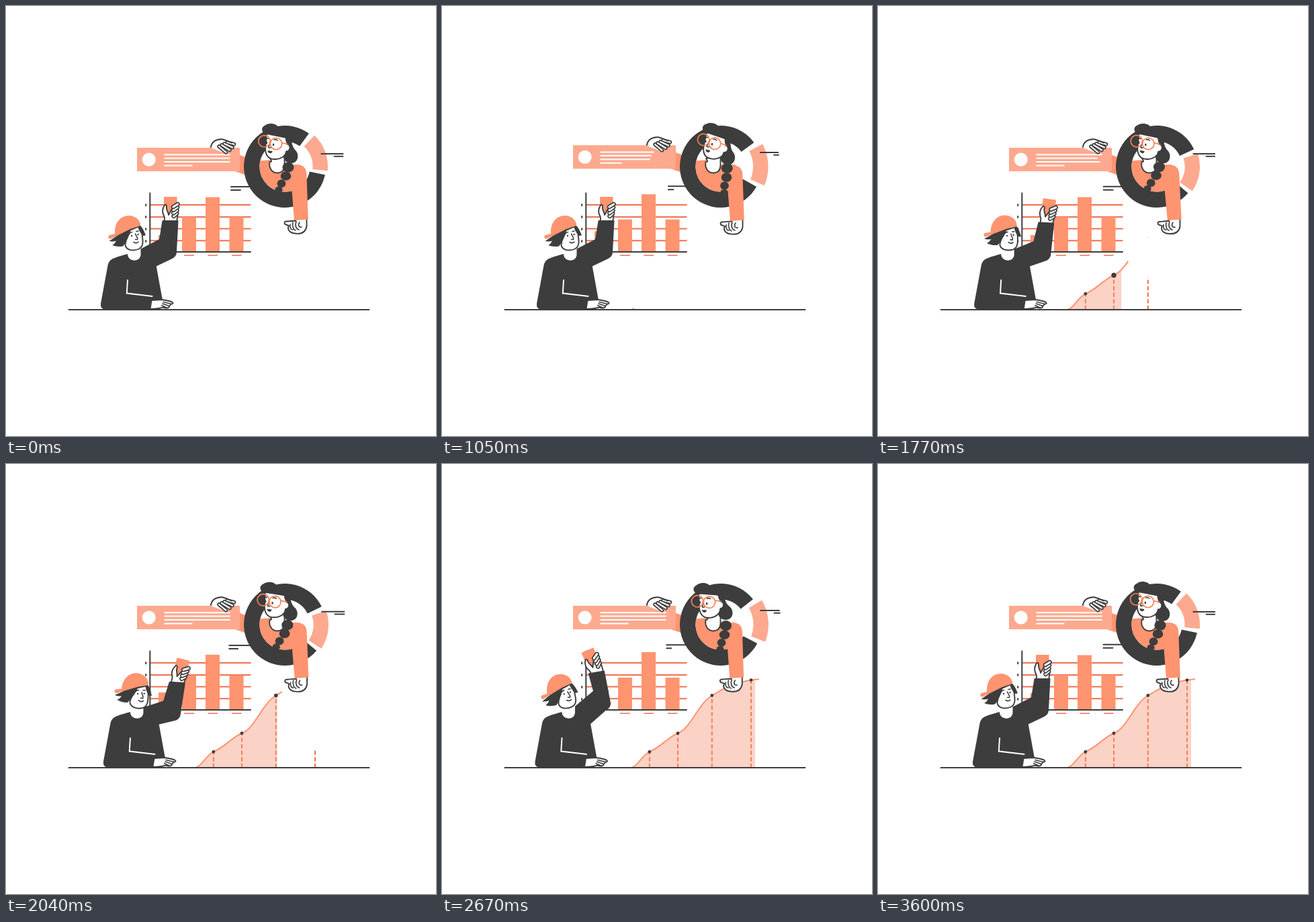
Animation, 640 px wide and 640 px high, one loop 3630 ms. Source, as an HTML page:

```html
<!DOCTYPE html>
<html lang="en">
<head>
<meta charset="utf-8">
<title>Team building charts</title>
<style>
  html, body { margin: 0; width: 100%; height: 100%; overflow: hidden; background: #fff; }
  svg { display: block; width: 100vw; height: 100vh; }
  .ink { fill: #3d3d3d; }
  .line { fill: none; stroke: #3d3d3d; stroke-width: 2; stroke-linecap: round; stroke-linejoin: round; }
  .thin { fill: none; stroke: #3d3d3d; stroke-width: 1.6; stroke-linecap: round; stroke-linejoin: round; }
  .skin { fill: #fff; stroke: #3d3d3d; stroke-width: 1.9; stroke-linecap: round; stroke-linejoin: round; }
  .coral { fill: #ff9470; }
  .soft { fill: #fda98f; }
  .grid { fill: none; stroke: #f0714f; stroke-width: 1.9; }
  .white { fill: none; stroke: #fff; stroke-width: 2; stroke-linecap: round; }
  .specs { fill: none; stroke: #f98057; stroke-width: 1.7; }
  .dash { stroke: #ef7038; stroke-width: 2; stroke-dasharray: 6.2 3.4; }
</style>
</head>
<body>
<svg viewBox="0 0 640 640">
  <defs>
    <clipPath id="hole"><circle cx="415" cy="239" r="37.6"/></clipPath>
    <clipPath id="wipe"><rect id="wipeBox" x="280" y="300" width="0" height="152"/></clipPath>
  </defs>

  <!-- bar chart -->
  <path class="grid" d="M215 296H364.500M215 314H364.500M215 331.500H364.500M215 349.300H364.500"/>
  <g id="bars" class="coral"></g>
  <path class="line" d="M214.300 278.500V366H364"/>
  <path class="line" d="M208.200 295.200v2M208.200 313v2M208.200 331v2M208.200 349v2"/>
  <path class="grid" style="stroke-width:1.5" d="M265 371.300h15M300.500 371.300h14.500M336 371.300h14.500"/>

  <!-- growing area chart -->
  <g id="stems"></g>
  <path id="area" fill="rgba(246,145,118,.41)" clip-path="url(#wipe)"/>
  <path id="trend" fill="none" stroke="#ff9470" stroke-width="2"/>
  <g id="dots" class="ink"></g>

  <path class="line" d="M93.500 452H540.500"/>

  <!-- woman in the ring chart -->
  <path id="marksL" class="line"/>
  <path id="sleeve" class="coral" d="M346 221L364 228V254L338 245Z"/>
  <path id="ring" class="ink"/>
  <path id="slice" class="soft"/>
  <path id="marksR" class="line"/>
  <path class="coral" clip-path="url(#hole)" d="M370 231L394 229L414 236H436L446 246V285H370Z"/>
  <g id="reach">
    <path id="reachHand" class="skin" d="M432 316L431 320C426 319 420 321 417 320.500C413.500 321 414 325 417 325.500L421 327C418 332 422 338 430 338.500C440 340 446 336 447.500 328V316Z"/>
    <path class="thin" d="M423 325C422 330 424 333 427 333M427 322C425.500 328 428 333 431 334M432 321C429.500 327 432 332 436 333M437 322C434 326 436 330 440 329"/>
    <path class="coral" d="M422 236H435C445 238 447.300 243 447.400 252L449.800 317.500L429 319L425.500 275Z"/>
  </g>
  <path class="skin" d="M393 227C396 231 396 232 392.500 232C391 240 395 248.500 404 248.500C411 248 414.500 244 414.500 237V220Z"/>
  <g id="braid" class="ink"></g>
  <g id="lady">
    <path class="ink" d="M389 191C379 189 379 180 386 177.500C392 173 403 175 406 181C416 180 423 187 425 197C425 207 428 212 432 216C437 223 434 233 426 234C415 235 411 226 413 216L405 195Z"/>
    <path class="skin" d="M388 190L418 196L418.500 206C424 206 424 216 417 216.500C416 224 408 228.500 400 228C391 228 386.500 223 386 213Z"/>
    <path class="ink" d="M386 191C392 185 407 183 418 190L419 204C415 203 417 197 415 196L393 191Z"/>
    <path class="thin" d="M393.500 202.500C393 206 390 209 391 211H394M399 199Q402 198 404 200M388 197.500L391 197"/>
    <ellipse class="ink" cx="388" cy="203.500" rx="1.200" ry="2"/>
    <ellipse class="ink" cx="398" cy="206.500" rx="1.200" ry="2"/>
    <path class="ink" d="M389.500 215L396.500 216C396 220.500 390 220.500 389.500 215Z"/>
    <circle class="specs" cx="384.500" cy="201.300" r="8.700"/>
    <circle class="specs" cx="402" cy="205" r="8.700"/>
    <path class="specs" d="M392 204L394.500 202.500M410.500 203.500L420 206"/>
  </g>

  <!-- note card -->
  <g id="card">
    <rect class="soft" x="195" y="211" width="153" height="35"/>
    <circle cx="212.700" cy="228.600" r="10" fill="#fff"/>
    <path id="rows" class="white" style="stroke-linecap:butt"/>
  </g>
  <g id="cardHand">
    <path d="M305 211C306 203 313 198 322 198L341 205L334 214L326 219L315 215Z" fill="#fff"/>
    <g id="cardFingers"></g>
    <path class="line" d="M305 210C306 202 313 197.800 321.500 198.200C327 199 331 202 336 203.500"/>
  </g>

  <!-- man with a bar -->
  <g id="lift">
    <rect class="coral" x="235" y="284" width="19.500" height="27"/>
    <path class="skin" d="M236 322L235.800 314C231.500 307 233 301 236 296.500C238 294.500 239.500 297 238.800 300C239 305 242 307 242 311L247 302L256 307L254 322Z"/>
    <g id="gripFingers"></g>
  </g>
  <g id="torso">
    <path class="ink" d="M151.500 386C154 376 160 375 181 369L201 362L223.500 386L233 438L217 438L214 452L240 452H148Q140 451 141 443Z"/>
    <path fill="#fff" d="M233.500 438L242 451H214L217 437Z"/>
    <path class="white" d="M181 408L179.800 427.500L217.500 432"/>
    <g id="rest">
      <path class="skin" stroke-width="1.600" d="M216.500 438L232 437C237 438 243 439 247 440.500C249.500 442 249 443.500 246 443.500L243 447C243 450 238 450 234 448.500C228 450.500 222 451 214.500 451Z"/>
      <path class="thin" d="M234 440.500L246 443.500M233 443L243 446.500M231.500 445.500L239 449"/>
    </g>
  </g>
  <path id="arm" class="ink" stroke="#3d3d3d" stroke-width="2" stroke-linejoin="round"/>
  <path id="neck" fill="#fff" d="M181 360V370C182 381 200 382 200.500 370V358Z"/>
  <g id="man">
    <path class="ink" d="M165 342L153.500 350Q160 351 164 349.500Q161 355 158 356Q165 359 174 357.500Q180 352 183 336L203 332L208 341.500L202 342L199 322L180 328Z"/>
    <path class="skin" d="M182 335C182 344 177.500 348 177.500 356C179 364 190 365 198 361.500C205 358 204 350 202.500 340L198 328Z"/>
    <path class="ink" d="M179 334L186 330C185 338 182 346 177 352L172 354Z"/>
    <path class="ink" d="M196 325C201 326 205 333 207.500 340.500C203 342 199 338 196 328Z"/>
    <path class="thin" d="M192.500 339C194 343 197 346 195.500 347.500H192.500M190 351.500Q194 354 197 351M183.500 339Q185 336.500 187.500 336.500M194 335.500L197 335"/>
    <circle class="ink" cx="187" cy="342" r="1.200"/>
    <circle class="ink" cx="196.500" cy="340" r="1.200"/>
    <path class="coral" d="M162 339C161 323 170 311.500 184 312C194 313 200 319 200 327L185 332L156 346.500C152 347.500 151 342 154 341Z"/>
  </g>
</svg>
<script>
const LOOP = 3630, HALF = LOOP / 2;
const $ = id => document.getElementById(id);
const put = (el, attrs) => { for (const k in attrs) el.setAttribute(k, attrs[k]); return el; };
const add = (parent, tag, attrs) =>
  parent.appendChild(put(document.createElementNS('http://www.w3.org/2000/svg', tag), attrs));
const clamp = v => Math.max(0, Math.min(1, v));

// smooth curve through [time, value] steps, without overshoot
function ease(steps, t) {
  const n = steps.length - 1;
  if (t <= steps[0][0]) return steps[0][1];
  if (t >= steps[n][0]) return steps[n][1];
  const rise = i => (steps[i + 1][1] - steps[i][1]) / (steps[i + 1][0] - steps[i][0]);
  const slope = i => {
    if (i === 0 || i === n) return 0;
    const a = rise(i - 1), b = rise(i);
    return a * b <= 0 ? 0 : 2 * a * b / (a + b);
  };
  let i = 0;
  while (t > steps[i + 1][0]) i++;
  const [t0, v0] = steps[i], [t1, v1] = steps[i + 1];
  const h = t1 - t0, u = (t - t0) / h, w = 1 - u;
  return v0 * (1 + 2 * u) * w * w + v1 * u * u * (3 - 2 * u) +
    h * u * w * (w * slope(i) - u * slope(i + 1));
}

const POSE = [[1450, 0], [1770, .55], [2160, 1.06], [2310, 1], [2700, -1], [3450, 0]];
const SWAY = [[0, 0], [480, 3], [1050, 14], [1790, -5], [2310, -1], [2670, 8], [2880, 9.5], [3630, 0]];
const TAP = [[0, 0], [480, -6], [950, 0]];
const DRAW = [[1000, 0], [1050, .02], [1400, .2], [1770, .49], [2310, .92], [2560, 1]];
const WIPE = [[1050, 285], [1400, 308], [1770, 362], [2310, 441], [2570, 466]];
const ROWS = [
  [[400, 98], [1050, 80], [1700, 98]],
  [[300, 98], [480, 95], [1050, 76], [1770, 91], [1980, 98]],
  [[200, 98], [480, 90], [1050, 74], [1770, 95], [1860, 98]],
  [[0, 42], [480, 36], [1000, 32], [1700, 42]]
];

// x, y, start of stem, start of dot
const POINTS = [[308.8, 428.3, 1130, 1330], [351, 400.7, 1340, 1560],
  [401.8, 344.5, 1560, 1755], [460, 321.6, 1950, 2295]];
const CURVE = 'M282 452C292 450 297 434 308.800 428.300C325 422 337 406 351 400.700' +
  'C371 393 380 358 401.800 344.500C420 333 438 325 460 321.600L472 320.200';
put($('trend'), { d: CURVE, pathLength: 1 });
put($('area'), { d: CURVE + 'V452Z' });
const stems = POINTS.map(([x]) => add($('stems'), 'line', { class: 'dash', x1: x, x2: x, y1: 452 }));
const dots = POINTS.map(([x, y]) => add($('dots'), 'circle', { cx: x, cy: y }));

// x, resting top, travel
const BARS = [[227, 341, -6], [262, 314, 4], [297, 284.5, -4.5], [332.5, 314, 4]];
const bars = BARS.map(([x]) => add($('bars'), 'rect', { x, width: 21 }));

// x, y, radii, share of the sway
const BEADS = [[420, 240, 8.6, 7.6, .3], [416.5, 253, 7.8, 6.8, .5],
  [410, 264.3, 6.4, 6, .75], [406, 273.5, 5.6, 5, 1]];
const beads = BEADS.map(([, , rx, ry]) => add($('braid'), 'ellipse', { rx, ry }));

function finger(group, x1, y1, x2, y2, w) {
  for (const [stroke, width] of [['#3d3d3d', w + 3.4], ['#fff', w]])
    add(group, 'line', { x1, y1, x2, y2, stroke, 'stroke-width': width, 'stroke-linecap': 'round' });
}
[[329, 203, 339.5, 205.8], [325, 205, 337, 210.5], [321, 207, 333, 214.5], [317, 209, 327.5, 217.8]]
  .forEach(f => finger($('cardFingers'), ...f, 2.2));
for (let i = 3; i >= 0; i--) finger($('gripFingers'), 249 + i * .2, 299 + i * 4.6, 255.5 - i * .5, 295 + i * 4.6, 3.2);

function arc(r0, r1, from, to) {
  const p = (r, a) => {
    a *= Math.PI / 180;
    return `${415 + r * Math.cos(a)} ${239 + r * Math.sin(a)}`;
  };
  const big = to - from > 180 ? 1 : 0;
  return `M${p(r1, from)}A${r1} ${r1} 0 ${big} 1 ${p(r1, to)}` +
    `L${p(r0, to)}A${r0} ${r0} 0 ${big} 0 ${p(r0, from)}Z`;
}

function showCharts(t, c, s) {
  const k = (1 - c) / 2;
  bars.forEach((bar, i) => {
    const y = BARS[i][1] + BARS[i][2] * k;
    put(bar, { y, height: 366 - y });
  });

  const turn = -54 + 14.5 * (1 - Math.cos(2 * Math.PI * t / LOOP));
  put($('ring'), { d: arc(37.6, 61, turn + 65.5, turn + 360) });
  put($('slice'), { d: arc(41.5 + 7 * k, 64 + 7 * k, turn + 7.5, turn + 59.5) });
  const lx = 335 - 4 * s, ly = 269 + 1.5 * s;
  put($('marksL'), { d: `M${lx} ${ly}H364M${lx} ${ly + 5}h${10.5 + 3.5 * c}` });
  const rx = 471.7 - 2.4 * c, ry = 219 + c, end = 501.5 + 2.6 * s;
  put($('marksR'), { d: `M${rx} ${ry}H${end}M${491.500 - 3 * c} ${ry + 3.7}H${end + .7 * k}` });

  const lift = t < HALF ? -4 * k : 0;
  put($('sleeve'), { transform: `translate(0 ${lift})` });
  put($('card'), { transform: `translate(0 ${lift})` });
  put($('cardHand'), { transform: `translate(0 ${lift * .8})` });
  put($('rows'), { d: ROWS.map((row, i) => `M235.500 ${221.2 + i * 5.4}h${ease(row, t)}`).join('') });

  const drawn = ease(DRAW, t);
  put($('trend'), { 'stroke-dasharray': `${drawn} 2`, visibility: drawn > 0 ? 'visible' : 'hidden' });
  put($('wipeBox'), { width: Math.max(0, ease(WIPE, t) - 280) });
  $('area').style.display = t > 1050 ? '' : 'none';
  POINTS.forEach(([, y, stem, dot], i) => {
    put(stems[i], { y2: 452 - (452 - y) * clamp((t - stem) / 470) });
    put(dots[i], { r: ease([[dot - 30, 0], [dot + 200, 3.7], [dot + 340, 2.4]], t) });
  });
}

function showWoman(t) {
  const w = Math.sin(2 * Math.PI * t / LOOP);
  put($('lady'), { transform: `rotate(${7.2 * w} 406 238)` });
  const sway = ease(SWAY, t);
  beads.forEach((bead, i) => {
    const [x, y, , , share] = BEADS[i], d = sway * share;
    put(bead, { cx: x + d, cy: y + d * .3 });
  });
  const drift = ease([[0, 0], [480, -.8], [1050, 0], [1770, 1.6], [2310, -.6], [2670, -.6], [3630, 0]], t);
  const drop = ease([[0, 0], [480, .9], [1050, 1.8], [1770, .4], [2310, 0]], t);
  put($('reach'), { transform: `translate(${drift * .5} ${drop * .5}) rotate(${-drift * .5} 436 240)` });
}

function showMan(t) {
  const p = ease(POSE, t);
  const pick = (fwd, back) => p > 0 ? fwd * p : -back * p;
  const dx = pick(4, -2.6), move = `translate(${dx} 0)`;
  put($('torso'), { transform: move });
  put($('neck'), { transform: move });
  put($('rest'), { transform: `rotate(${ease(TAP, t)} 216 446)` });
  put($('man'), { transform: `${move} rotate(${pick(10, -5.5)} 190 372)` });

  const ex = pick(6, -3), ey = pick(5.5, -10), cx = pick(10.5, -15), cy = pick(5.5, -10);
  const tilt = pick(4, -10) * Math.PI / 180 * 11;
  const at = (x, y) => `${x} ${y}`;
  put($('arm'), { d:
    `M${at(198 + dx, 364)}L${at(229 + ex, 348 + ey)}L${at(233.5 + cx, 320 + cy - tilt)}` +
    `L${at(255.5 + cx, 320 + cy + tilt)}L${at(253 + ex, 366 + ey)}` +
    `Q${at(253 + ex, 372 + ey)} ${at(247 + ex, 375 + ey)}L${at(222 + dx, 387)}L${at(205 + dx, 400)}Z` });
  put($('lift'), { transform: `translate(${cx} ${cy}) rotate(${pick(15, -24)} 244.500 319)` });
}

function show(t) {
  const a = 2 * Math.PI * t / HALF;
  showCharts(t, Math.cos(a), Math.sin(a));
  showWoman(t);
  showMan(t);
}

const start = performance.now();
function tick(now) {
  show(Math.max(0, now - start) % LOOP);
  requestAnimationFrame(tick);
}
show(0);
requestAnimationFrame(tick);
</script>
</body>
</html>
```
